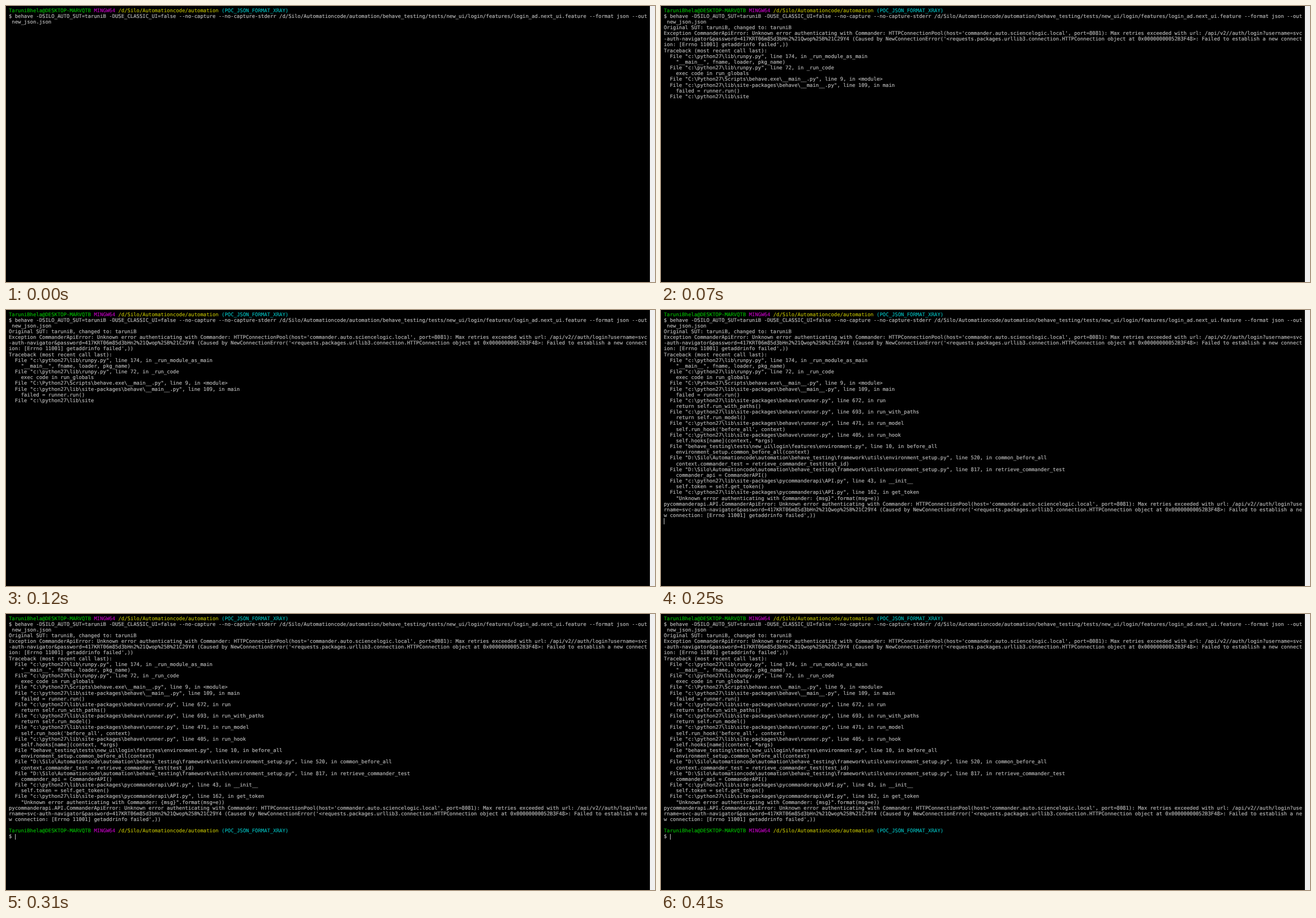
Animation, 1147 px wide and 488 px high, one loop 0.48 s. Source, as an HTML page:

```html
<!DOCTYPE html>
<html lang="en">
<head>
<meta charset="utf-8">
<title>Terminal test run</title>
<style>
  html, body { margin: 0; width: 100%; height: 100%; overflow: hidden; background: #000; }
  pre {
    position: absolute; left: 5px; top: 3.5px; margin: 0;
    font: 8.932px/10.15px "DejaVu Sans Mono", monospace;
    font-variant-ligatures: none; text-rendering: geometricPrecision;
    -webkit-text-stroke: 0.15px currentColor;
    color: #bfbfbf;
  }
  .user { color: #00bf00; }
  .system { color: #bf00bf; }
  .path { color: #bfbf00; }
  .branch { color: #00bfbf; }
  #cursor { position: absolute; width: 1px; height: 10.15px; background: #bfbfbf; }
  #scrollbar { position: absolute; left: 1138px; top: 0; width: 9px; height: 488px; background: #f0f0f0; }
</style>
</head>
<body>
<pre><span class="prompt"></span>
$ behave -DSILO_AUTO_SUT=taruniB -DUSE_CLASSIC_UI=false --no-capture --no-capture-stderr /d/Silo/Automationcode/automation/behave_testing/tests/new_ui/login/features/login_ad.next_ui.feature --format json --out
 new_json.json
<span data-from="70">Original SUT: taruniB, changed to: taruniB
Exception CommanderApiError: Unknown error authenticating with Commander: HTTPConnectionPool(host='commander.auto.sciencelogic.local', port=8081): Max retries exceeded with url: /api/v2//auth/login?username=svc
-auth-navigator&amp;password=417KRT06m85d3bHn2%21Qwop%25B%21C29Y4 (Caused by NewConnectionError('&lt;requests.packages.urllib3.connection.HTTPConnection object at 0x00000000052B3F48&gt;: Failed to establish a new connect
ion: [Errno 11001] getaddrinfo failed',))
Traceback (most recent call last):
  File "c:\python27\lib\runpy.py", line 174, in _run_module_as_main
    "__main__", fname, loader, pkg_name)
  File "c:\python27\lib\runpy.py", line 72, in _run_code
    exec code in run_globals
  File "C:\Python27\Scripts\behave.exe\__main__.py", line 9, in &lt;module&gt;
  File "c:\python27\lib\site-packages\behave\__main__.py", line 109, in main
    failed = runner.run()
  File "c:\python27\lib\site</span><span data-from="160">-packages\behave\runner.py", line 672, in run
    return self.run_with_paths()
  File "c:\python27\lib\site-packages\behave\runner.py", line 693, in run_with_paths
    return self.run_model()
  File "c:\python27\lib\site-packages\behave\runner.py", line 471, in run_model
    self.run_hook('before_all', context)
  File "c:\python27\lib\site-packages\behave\runner.py", line 405, in run_hook
    self.hooks[name](context, *args)
  File "behave_testing\tests\new_ui\login\features\environment.py", line 10, in before_all
    environment_setup.common_before_all(context)
  File "D:\Silo\Automationcode\automation\behave_testing\framework\utils\environment_setup.py", line 520, in common_before_all
    context.commander_test = retrieve_commander_test(test_id)
  File "D:\Silo\Automationcode\automation\behave_testing\framework\utils\environment_setup.py", line 817, in retrieve_commander_test
    commander_api = CommanderAPI()
  File "c:\python27\lib\site-packages\pycommanderapi\API.py", line 43, in __init__
    self.token = self.get_token()
  File "c:\python27\lib\site-packages\pycommanderapi\API.py", line 162, in get_token
    "Unknown error authenticating with Commander: {msg}".format(msg=e))
pycommanderapi.API.CommanderApiError: Unknown error authenticating with Commander: HTTPConnectionPool(host='commander.auto.sciencelogic.local', port=8081): Max retries exceeded with url: /api/v2//auth/login?use
rname=svc-auth-navigator&amp;password=417KRT06m85d3bHn2%21Qwop%25B%21C29Y4 (Caused by NewConnectionError('&lt;requests.packages.urllib3.connection.HTTPConnection object at 0x00000000052B3F48&gt;: Failed to establish a ne
w connection: [Errno 11001] getaddrinfo failed',))
</span><span data-from="310">
<span class="prompt"></span>
$ </span></pre>
<div id="cursor"></div>
<div id="scrollbar"></div>
<script>
  const LOOP = 480, COLUMN = 5.377, ROW = 10.15;
  const cursor = document.getElementById('cursor');
  const chunks = document.querySelectorAll('[data-from]');

  for (const prompt of document.querySelectorAll('.prompt')) {
    prompt.innerHTML = '<span class="user">TaruniBhela@DESKTOP-MARVQTB</span> ' +
      '<span class="system">MINGW64</span> ' +
      '<span class="path">/d/Silo/Automationcode/automation</span> ' +
      '<span class="branch">(POC_JSON_FORMAT_XRAY)</span>';
  }

  function placeCursor(column, row) {
    cursor.style.left = 5 + column * COLUMN + 'px';
    cursor.style.top = 3 + row * ROW + 'px';
  }

  const start = performance.now();
  function draw(now) {
    const time = Math.max(0, now - start) % LOOP;
    for (const chunk of chunks) chunk.hidden = time < chunk.dataset.from;
    cursor.hidden = time < 160;
    if (time < 310) placeCursor(0, 36);
    else placeCursor(2, 38);
    requestAnimationFrame(draw);
  }
  draw(start);
</script>
</body>
</html>
```
